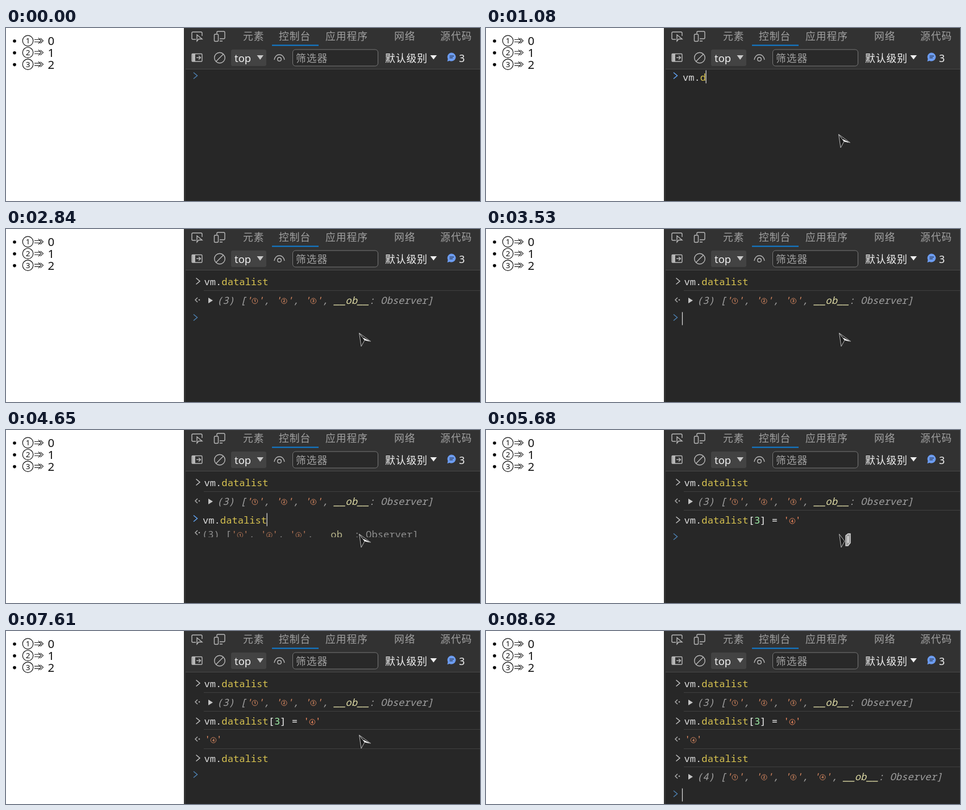
An HTML page that plays this animation: 834x305 px, repeating every 9080 ms.

```html
<!DOCTYPE html>
<html lang="zh">
<head>
<meta charset="utf-8">
<style>
  html, body { margin: 0; width: 100%; height: 100%; overflow: hidden; background: #fff; }
  svg { display: block; }
  text { white-space: pre; font-family: "Noto Sans", "Noto Sans CJK SC", sans-serif; }
  .mono { font: 500 17.15px "Noto Sans Mono", "DejaVu Sans Mono", monospace; }
  .cjk { font: 17.8px "Noto Sans CJK SC", "Noto Sans CJK", sans-serif; letter-spacing: 1px; fill: #a0a0a0; }
  .line { fill: none; stroke: #b8b8b8; stroke-width: 1.4; }
</style>
</head>
<body>
<svg width="834" height="305" viewBox="0 0 834 305">
  <g id="list"></g>

  <rect x="313" width="521" height="305" fill="#323232"/>
  <rect x="316" y="72" width="518" height="233" fill="#272727"/>
  <path d="M316 72.5H834" stroke="#484848"/>

  <g class="cjk">
    <text x="417" y="21">元素</text>
    <text x="480" y="21">控制台</text>
    <text x="562" y="21">应用程序</text>
    <text x="683" y="21">网络</text>
    <text x="764" y="21">源代码</text>
  </g>
  <rect x="468" y="29.5" width="82" height="2" fill="#0f7fd6"/>

  <g class="line">
    <path d="M334 20H329Q327 20 327 18V9Q327 7 329 7H343Q345 7 345 9V14M336 12V23L339 19.500H345Z"/>
    <path d="M371 10V8Q371 6 373 6H383Q385 6 385 8V17Q385 19 383 19H376M376 23H381"/>
    <rect x="366.500" y="11" width="7" height="12.500" rx="1.500"/>
    <rect x="327" y="45.500" width="18" height="13.500" rx="1.500"/>
    <circle cx="376" cy="52.500" r="9.300"/>
    <path d="M369.500 59L382.500 46M472 56Q474 47 481 47T490 56"/>
    <circle cx="481" cy="55" r="3.300"/>
  </g>
  <path d="M328 46H333V59H328Z" fill="#b8b8b8"/>
  <path d="M335 52.300H342M339 49L342.500 52.300L339 55.500" class="line"/>

  <rect x="396" y="38" width="62" height="29" rx="3" fill="#434343"/>
  <text x="402" y="60" font-size="18.500" fill="#f0f0f0">top</text>
  <path d="M441.500 48H453L447.200 56Z" fill="#c8c8c8"/>
  <rect x="504.500" y="38" width="150" height="29" rx="5" fill="#292929" stroke="#777"/>
  <text class="cjk" x="510" y="60">筛选器</text>
  <text class="cjk" x="667" y="60" style="fill:#f0f0f0">默认级别</text>
  <path d="M746.500 48H758L752.200 55.500Z" fill="#f0f0f0"/>
  <path d="M784 43.500a7.500 7.500 0 1 1 -3.500 14.200L776.500 59L777.500 54.500A7.500 7.500 0 0 1 784 43.500Z" fill="#6c9cf0"/>
  <path d="M780.500 49.500H788M780.500 52.500H786" stroke="#2c3a58" stroke-width="1.300"/>
  <text x="797" y="60" font-size="18" fill="#f0f0f0">3</text>

  <clipPath id="cut"><rect id="cutBox" x="316" width="518" height="15"/></clipPath>
  <g id="console"></g>
  <g id="mouse"></g>
</svg>

<script>
const LOOP = 9080, CELL = 10.29;
const $ = id => document.getElementById(id);
const QUERY = 'vm.datalist', ASSIGN = "vm.datalist[3] = '④'";
const observed = n =>
  `(${n}) [${[...'①②③④'].slice(0, n).map(c => `'${c}', `).join('')}__ob__: Observer]`;

// [text, is result, has expander]
const rows = [
  [QUERY], [observed(3), 1, 1],
  [ASSIGN], ["'④'", 1],
  [QUERY], [observed(4), 1, 1],
];
const rowY = [93, 126, 159.5, 191.5, 225, 257];
const promptY = [84, 122, 156, 188, 221, 253, 287];

// [start, rows shown, typed text, caret, preview length]
const steps = [
  [0, 0, '', 0], [310, 0, '', 1], [550, 0, 'vm', 1], [1080, 0, 'vm.d', 1],
  [1170, 0, 'vm.data', 1], [1750, 0, QUERY, 0, 3], [2400, 0, QUERY, 1, 3],
  [2610, 1, '', 0], [2720, 2, '', 0], [3530, 2, '', 1], [4210, 2, '', 0],
  [4650, 2, QUERY, 1, 3], [4990, 2, ASSIGN, 1],
  [5560, 3, '', 0], [5790, 4, '', 0], [6120, 4, '', 1],
  [6460, 4, ASSIGN, 1], [6920, 4, QUERY, 1, 4],
  [7490, 5, '', 0], [7720, 6, '', 0], [8040, 6, '', 1],
  [8500, 6, '', 0], [8620, 6, '', 1],
];

// [start, x, y, turned]; no x means hidden
const moves = [
  [0], [80, 655, 235], [195, 632, 205], [310, 620, 187],
  [2720, 621, 183], [5680, 621, 183, 1], [5790, 621, 183], [7720],
];

const path = (d, stroke, fill = 'none', width = 1.5) =>
  `<path d="${d}" stroke="${stroke}" fill="${fill}" stroke-width="${width}"/>`;
const chevron = (x, y, color) => path(`M${x} ${y - 5.5}l6.500 5.500l-6.500 5.500`, color);
const returnMark = y =>
  path(`M337 ${y - 4.5}l-4 4l4 4`, '#aaa') + `<circle cx="340" cy="${y - 0.5}" r="1.300" fill="#aaa"/>`;

function circled(cx, cy, r, digit, color, width, weight = 400) {
  return `<circle cx="${cx}" cy="${cy}" r="${r}" fill="none" stroke="${color}" stroke-width="${width}"/>
    <text x="${cx}" y="${cy + r * 0.52}" font-size="${r * 1.45}" font-weight="${weight}" text-anchor="middle" fill="${color}">${digit}</text>`;
}

// Lays out coloured tokens on the monospace grid.
function tokens(x, y, parts, paint, style = '') {
  return parts.map(part => {
    const quoted = part[0] === "'", color = paint(part);
    let out = `<text class="mono" x="${x}" y="${y}" fill="${color}" style="${style}">${quoted ? "' '" : part}</text>`;
    if (quoted) out += circled(x + 1.5 * CELL, y - 4.8, 4.8, part.charCodeAt(1) - 0x245f, color, 0.9, 600);
    x += part.length * CELL;
    return out;
  }).join('');
}

const code = (x, y, text) =>
  tokens(x, y, text.match(/vm|'.'|\d|[a-z]+|[^a-z\d']+/g) || [], part =>
    part[0] === "'" ? '#f28a5e' : /\d/.test(part) ? '#9ff0a8' : /^vm/.test(part) ? '#dcdcdc'
      : /^\W/.test(part) ? '#f2f2f2' : '#d8c350');

const value = (x, y, text, gray, style) =>
  tokens(x, y, text.match(/__ob__|'.'|[^'_]+/g), part =>
    part[0] === "'" ? '#dc8b62' : part[0] === '_' ? '#dcd9a4' : gray, style);

function row([text, result, expander], i) {
  const y = rowY[i], base = y + 5.7;
  const rule = i ? path(`M348 ${Math.floor(y - 18) + 0.5}H834`, '#404040', 'none', 1) : '';
  if (!result) return rule + chevron(334.5, y - 1, '#c4c4c4') + code(348.5, base, text);
  return rule + returnMark(y - 0.5) + (expander
    ? path(`M356 ${y - 5}l8 5l-8 5Z`, 'none', '#c4c4c4') + value(371, base, text, '#a0a0a0', 'font-style:italic')
    : value(349.5, base, text, '#a0a0a0'));
}

function drawConsole([, count, typed, caret, preview]) {
  const y = promptY[count], base = y + 8.5;
  let out = rows.slice(0, count).map(row).join('');
  out += chevron(330, y, typed ? '#62a4f4' : '#4d7fae') + code(346, base, typed);
  if (caret) {
    const x = typed ? 346 + typed.length * CELL : 345.5;
    out += path(`M${x} ${y - 9.5}v23`, '#e0e0e0', 'none', 1.2);
  }
  if (preview) {
    $('cutBox').setAttribute('y', y + 18);
    out += returnMark(y + 25.5) +
      `<g clip-path="url(#cut)" opacity=".8">${value(345, y + 34, observed(preview), '#aaa')}</g>`;
  }
  $('console').innerHTML = out;
}

function drawMouse([, x, y, turned]) {
  const left = path('M.5 .5L10 13L4 24Z', '#bbb', '#1c1c1c', 1);
  const right = turned
    ? path('M12 3L16 0H20V16L16 21H12Z', '#ddd', '#999', 1.3) + path('M16 4V16', '#fff')
    : path('M.5 .5L20.500 15L10 13Z', '#bbb', '#1c1c1c', 1) + path('M8 9.500L17 14L10.500 12.500Z', '#fff', '#fff', 1);
  $('mouse').innerHTML = x ? `<g transform="translate(${x} ${y})">${left}${right}</g>` : '';
}

$('list').innerHTML = [0, 1, 2].map(i => {
  const y = 22.5 + i * 20.8;
  return `<circle cx="15" cy="${y + 0.5}" r="2.800"/>` + circled(38.500, y, 9.3, i + 1, '#111', 1.2) +
    path(`M50 ${y - 2}h11M50 ${y + 2}h11M57 ${y - 5}l5 5l-5 5M60.500 ${y - 4.5}l5 4.500l-5 4.500`, '#222', 'none', 1.1) +
    `<text x="73.500" y="${y + 7.8}" font-size="20.500" fill="#111">${i}</text>`;
}).join('');

let shownStep, shownMove;
function frame() {
  const t = performance.now() % LOOP;
  const at = list => list.findLast(item => item[0] <= t);
  const step = at(steps), move = at(moves);
  if (step !== shownStep) drawConsole(shownStep = step);
  if (move !== shownMove) drawMouse(shownMove = move);
  requestAnimationFrame(frame);
}
frame();
</script>
</body>
</html>
```
